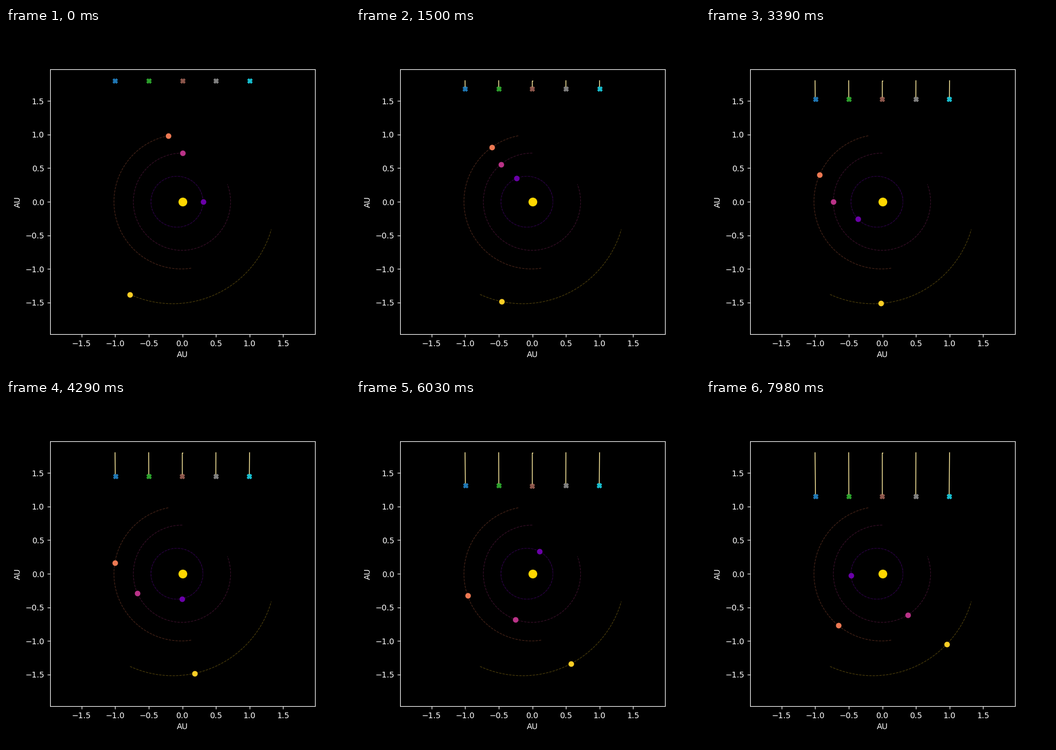
A matplotlib script that plays this animation: 600x600 px, repeating every 8 s.

```python
import numpy as np
import matplotlib.pyplot as plt
from matplotlib.animation import FuncAnimation

plt.style.use("dark_background")

FRAMES = 267
LOOP_MS = 8000
DAYS_PER_FRAME = 0.5
SPAN_DAYS = 182.5
LIMIT = 1.97

# semi-major axis (AU), eccentricity, period (days), starting true anomaly (deg)
PLANETS = [
    (0.3871, 0.2056, 87.969, 0.0),
    (0.7233, 0.0068, 224.70, 90.0),
    (1.0000, 0.0167, 365.256, 102.0),
    (1.5237, 0.0934, 686.98, 240.6),
]
PLANET_COLORS = plt.cm.plasma(np.linspace(0.2, 0.9, 4))

PROBE_X = np.linspace(-1, 1, 5)
PROBE_Y = 1.8
PROBE_COLORS = plt.cm.tab10(np.linspace(0, 1, 5))


def orbit(planet, days):
    """Position on a Kepler ellipse with the Sun at the origin."""
    a, e, period, start = planet
    nu = np.radians(start)
    ecc0 = 2 * np.arctan2(np.sqrt(1 - e) * np.sin(nu / 2),
                          np.sqrt(1 + e) * np.cos(nu / 2))
    mean = ecc0 - e * np.sin(ecc0) + 2 * np.pi * np.asarray(days) / period
    ecc = mean
    for _ in range(8):
        ecc = ecc - (ecc - e * np.sin(ecc) - mean) / (1 - e * np.cos(ecc))
    return a * (np.cos(ecc) - e), a * np.sqrt(1 - e * e) * np.sin(ecc)


def fall(x0, days):
    """Almost straight drop with a faint pull towards the centre."""
    days = np.asarray(days)
    x = x0 * (1 - 4e-5 * days) - 1e-9 * (days > 0)
    y = PROBE_Y - (0.00489 - 0.00004 * x0 ** 2) * days
    return x, y


fig, ax = plt.subplots(figsize=(6, 6), dpi=100)
ax.set_aspect("equal")
ax.set_xlim(-LIMIT, LIMIT)
ax.set_ylim(-LIMIT, LIMIT)
ax.set_xlabel("AU")
ax.set_ylabel("AU")

span = np.arange(0, SPAN_DAYS, DAYS_PER_FRAME)
planet_dots = []
for planet, color in zip(PLANETS, PLANET_COLORS):
    ax.plot(*orbit(planet, span), "--", color=color, lw=0.8, alpha=0.3)
    planet_dots += ax.plot([], [], "o", color=color, ms=6)

ax.plot(0, 0, "o", color="gold", ms=10)

trails, probe_dots = [], []
for color in PROBE_COLORS:
    trails += ax.plot([], [], color="#ffed9f", lw=1)
    probe_dots += ax.plot([], [], "X", color=color, ms=6)


def update(frame):
    days = np.arange(frame + 1) * DAYS_PER_FRAME
    for planet, dot in zip(PLANETS, planet_dots):
        x, y = orbit(planet, days[-1])
        dot.set_data([x], [y])
    for x0, trail, dot in zip(PROBE_X, trails, probe_dots):
        x, y = fall(x0, days)
        trail.set_data(x, y)
        dot.set_data(x[-1:], y[-1:])
    return planet_dots + trails + probe_dots


anim = FuncAnimation(fig, update, frames=FRAMES, interval=LOOP_MS / FRAMES,
                     init_func=lambda: update(0), repeat=True,
                     repeat_delay=0, blit=False)
plt.show()
```
